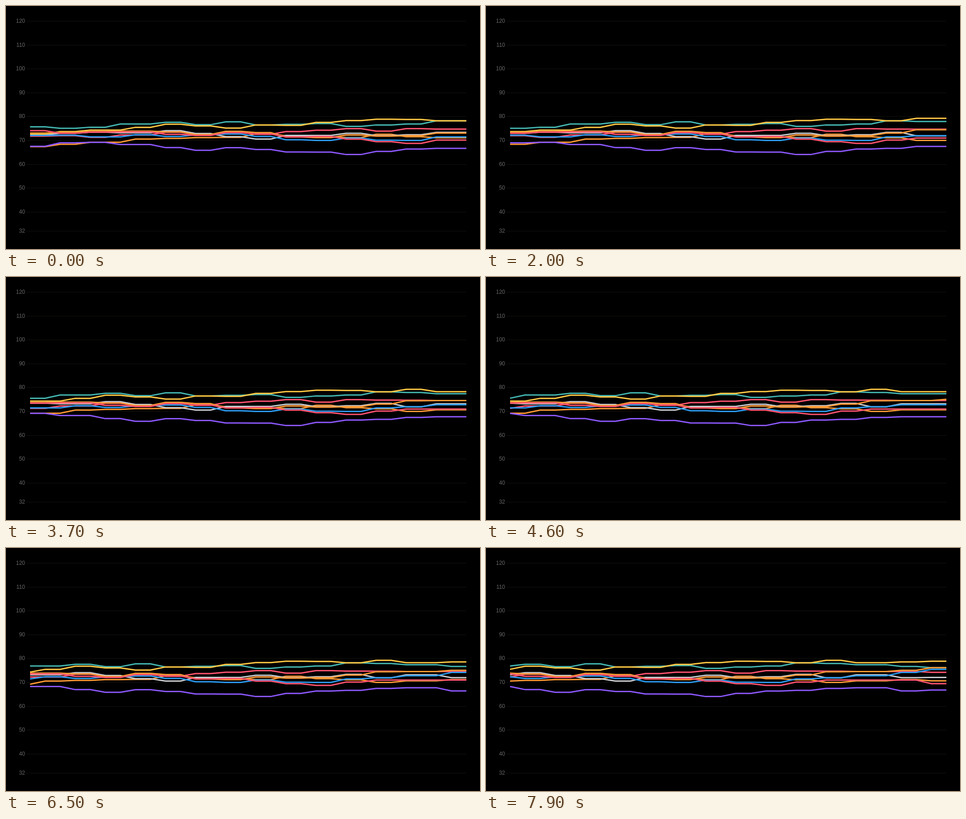
Recreate the animation shown at these times as an HTML page with a canvas. Size 1044x536 px, loop 8 s.

```html
<!DOCTYPE html>
<html>
<head>
<meta charset="utf-8">
<style>
  html, body { margin: 0; width: 100%; height: 100%; overflow: hidden; background: #000; }
  canvas { display: block; }
</style>
</head>
<body>
<canvas id="chart" width="1044" height="536"></canvas>
<script>
const ctx = document.getElementById('chart').getContext('2d');
const LOOP = 8000, LEFT = 53, RIGHT = 1014, POINTS = 30;
const STEP = (RIGHT - LEFT) / (POINTS - 1);
const yOf = value => 33 + (120 - value) * 5.261;

// Topmost series first; each value is one reading.
const series = [];
const addSeries = (color, late, ...readings) => series.push({ color, late, readings });
addSeries('#ff5370', false, 74, 72.9, 73.4, 73.5, 72.5, 72, 73.2, 72.6, 71.4, 71.6, 70.5, 69.4, 68.7, 70.05, 70.9, 70.9, 70.9, 69.4);
addSeries('#ff9933', false, 73, 73.3, 73.6, 73.8, 73.5, 72.4, 73.7, 73.2, 71.4, 71.1, 72.2, 71.7, 71.9, 73, 74.4, 74.5, 75, 76.1);
addSeries('#ffc844', true, 72.6, 73.6, 74.25, 75.4, 76.7, 76, 75.1, 76.4, 76.25, 77.45, 78.25, 78.8, 78.7, 78.15, 79.2, 78.2, 78.5, 78.8);
addSeries('#43b5b0', false, 75.6, 75, 75.45, 76.8, 77.5, 76.5, 77.7, 76.4, 76.65, 77, 75.8, 76.4, 76.8, 78.15, 77.85, 77.35, 76.6, 76.1);
addSeries('#2b9bf0', true, 72, 72.1, 71.4, 72.3, 71.6, 72.3, 72.6, 71.6, 70.2, 69.9, 70.9, 70, 69.9, 71.4, 71.9, 72.7, 74.1, 75.4);
addSeries('#8b57fa', false, 67.45, 68.9, 69.1, 68.2, 66.9, 65.8, 66.85, 66.1, 65.05, 65, 64, 65.3, 66.3, 66.6, 67.4, 67.7, 66.35, 66.75);
addSeries('#c9cbcf', false, 72.3, 72.9, 73.4, 73.1, 74, 72.8, 71.5, 70.5, 72, 72, 72.9, 71.9, 72.3, 73.3, 71.8, 73.1, 71.9, 72);
addSeries('#ff5370', false, 71.7, 71.9, 71.2, 72.2, 73.4, 72.3, 73.4, 72.5, 73.6, 74.2, 74.85, 73.8, 74.85, 74.65, 74.6, 74.5, 74.5, 74.15);
addSeries('#ff9933', true, 67.3, 68.3, 69.15, 70.5, 70.75, 71.1, 71.2, 72.7, 71.8, 71.4, 71.1, 72.5, 71.5, 71, 69.9, 70.6, 71.1, 70.6);

// Readings last about two samples; slow ones are held for a third.
function readingAt(sample, late) {
  if (sample < (late ? 6 : 7)) return sample >> 1;
  return (sample < 33 ? sample - 1 : sample - 2) >> 1;
}

function liveReading(time, index) {
  const updates = [500, 2500, index === 1 ? 4600 : 4700, 6700];
  return 13 + updates.filter(at => time >= at).length;
}

function drawGrid() {
  ctx.font = '12px "Liberation Sans", Arial, sans-serif';
  ctx.textAlign = 'right';
  ctx.textBaseline = 'middle';
  for (const value of [120, 110, 100, 90, 80, 70, 60, 50, 40, 32]) {
    const y = Math.round(yOf(value));
    ctx.fillStyle = '#121210';
    ctx.fillRect(45, y, RIGHT - 45, 1);
    ctx.fillStyle = '#666';
    ctx.fillText(value, 42, y + 0.5);
  }
}

function drawSeries(time) {
  const shift = Math.floor((time + 400) / 1000);
  ctx.lineWidth = 3;
  for (let index = series.length - 1; index >= 0; index--) {
    const { color, late, readings } = series[index];
    ctx.strokeStyle = color;
    ctx.beginPath();
    for (let i = 0; i < POINTS; i++) {
      const reading = i < POINTS - 1 ? readingAt(i + shift, late) : liveReading(time, index);
      ctx.lineTo(LEFT + i * STEP, yOf(readings[reading]));
    }
    ctx.stroke();
  }
}

function draw(now) {
  ctx.fillStyle = '#000';
  ctx.fillRect(0, 0, 1044, 536);
  drawGrid();
  drawSeries(now % LOOP);
  requestAnimationFrame(draw);
}
draw(0);
</script>
</body>
</html>
```
